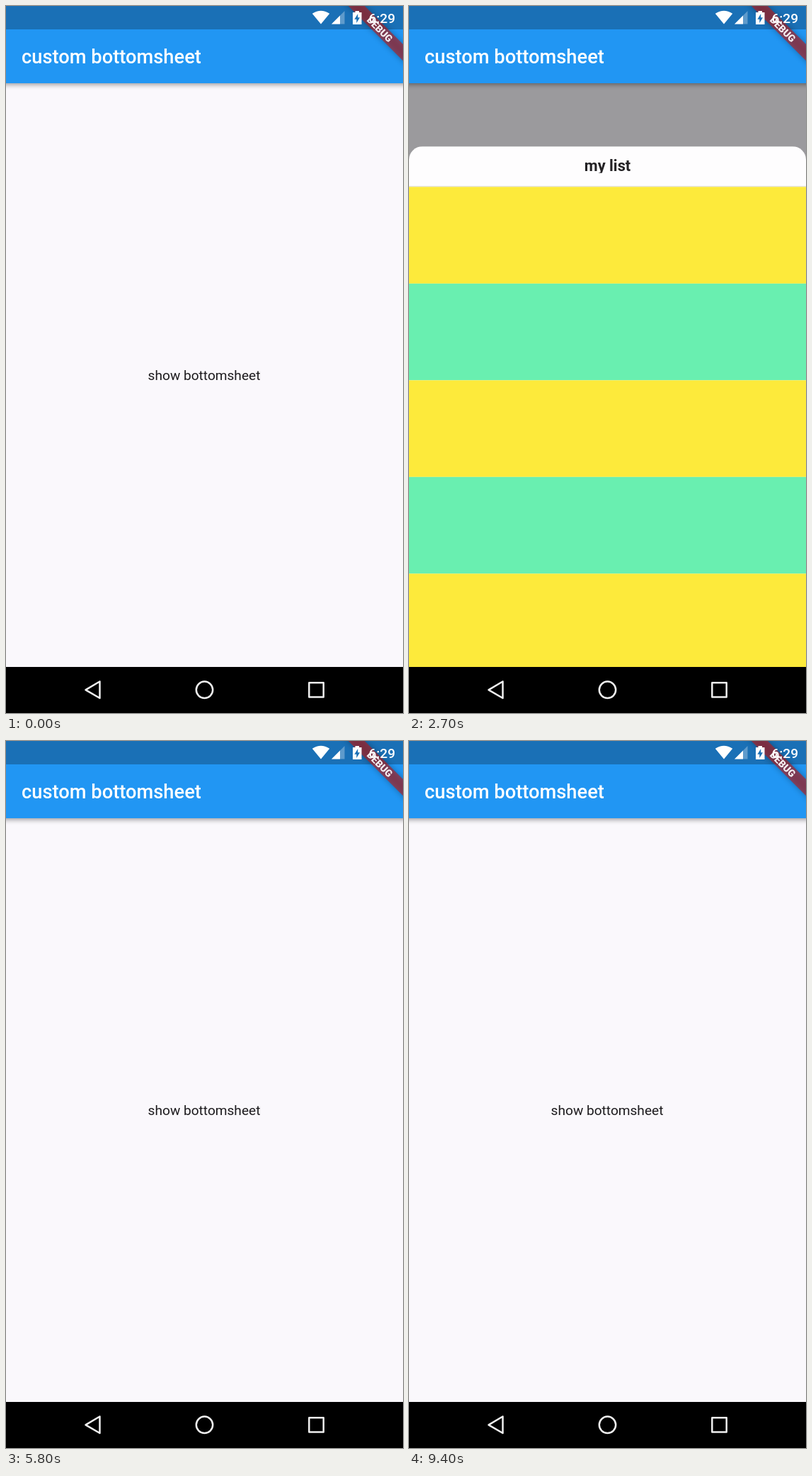
An HTML page with a canvas that plays this animation: 561x998 px, repeating every 9600 ms.

```html
<!DOCTYPE html>
<html lang="en">
<head>
<meta charset="utf-8">
<title>custom bottomsheet</title>
<style>
html, body { margin: 0; width: 100%; height: 100%; overflow: hidden; background: #000; }
canvas { display: block; width: 561px; height: 998px; }
</style>
</head>
<body>
<canvas id="stage" width="561" height="998"></canvas>
<script>
const ctx = document.getElementById('stage').getContext('2d');
const W = 561, H = 998, LOOP = 9600, STEP = 100;
const DP = W / 411, BAR = 33, BODY = 109, NAV = 933, HALF = 499, ROW = 100 * DP;

const linear = p => p;
const easeOut = p => 1 - (1 - p) ** 3;
const easeIn = p => p ** 1.5;

// Sheet top: [time, y, easing towards this point]
const sheetPath = [
  [0, NAV], [50, NAV], [450, HALF, easeOut],
  [2000, HALF], [2200, 421], [2900, BODY],
  [3100, BODY], [3400, 231], [4100, 482], [4200, 540], [4400, NAV],
  [4750, NAV], [5150, HALF, easeOut], [5400, HALF], [5700, NAV, easeIn],
  [6650, NAV], [7050, HALF, easeOut], [8500, HALF], [8750, NAV, easeIn],
  [LOOP, NAV]
];
// Back button highlight: [time, opacity]
const pressPath = [[0, 0], [8250, 0], [8450, 1], [8600, 1], [8900, 0], [LOOP, 0]];

function follow(path, t) {
  const i = path.findIndex(k => k[0] > t);
  const [t0, v0] = path[i - 1], [t1, v1, ease = linear] = path[i];
  return v0 + (v1 - v0) * ease((t - t0) / (t1 - t0));
}

function rect(x, y, w, h, color) {
  ctx.fillStyle = color;
  ctx.fillRect(x, y, w, h);
}

function poly(points, color) {
  ctx.beginPath();
  points.forEach(([x, y]) => ctx.lineTo(x, y));
  ctx.closePath();
  if (color) {
    ctx.fillStyle = color;
    ctx.fill();
  }
}

function text(str, x, y, size, weight, color, align = 'left') {
  ctx.font = `${weight} ${size}px Roboto, sans-serif`;
  ctx.textAlign = align;
  ctx.fillStyle = color;
  ctx.fillText(str, x, y);
}

function drawBody(top) {
  rect(0, BODY, W, NAV - BODY, '#faf8fc');
  text('show bottomsheet', W / 2 - 0.5, 527.5, 14 * DP, 400, '#1d1b1e', 'center');
  const shade = Math.min(1, (NAV - top) / (NAV - 540));
  if (shade > 0) rect(0, BODY, W, NAV - BODY, `rgba(0,0,0,${0.38 * shade})`);
}

function drawSheet(top) {
  if (top >= NAV) return;
  ctx.save();
  ctx.beginPath();
  ctx.roundRect(0, top, W, H, [19, 19, 0, 0]);
  ctx.clip();
  rect(0, top, W, H, '#fefdfe');

  ctx.save();
  ctx.beginPath();
  ctx.rect(0, top, W, 37.5);
  ctx.clip();
  text('my list', W / 2, top + 34.5, 16 * DP, 700, '#232124', 'center');
  ctx.restore();

  rect(0, top + 56, W, 1.2, '#dedcda');
  for (let i = 0, y = top + 57.2; y < NAV; i++, y += ROW) {
    rect(0, y, W, ROW, i % 2 ? '#69efb0' : '#fdea3b');
  }
  ctx.restore();
}

function drawAppBar() {
  ctx.save();
  ctx.shadowColor = 'rgba(0,0,0,0.4)';
  ctx.shadowBlur = 7;
  ctx.shadowOffsetY = 2;
  rect(-10, BAR, W + 20, BODY - BAR, '#2196f3');
  ctx.restore();
  rect(0, 0, W, BAR, '#1a70b6');
  text('custom bottomsheet', 22, 81, 20 * DP, 500, '#fff');
}

function drawBanner() {
  ctx.save();
  ctx.translate(W, 0);
  ctx.rotate(Math.PI / 4);
  ctx.scale(DP, DP);
  ctx.shadowColor = 'rgba(0,0,0,0.5)';
  ctx.shadowBlur = 8;
  rect(-50, 28, 100, 12, 'rgba(183,28,28,0.627)');
  ctx.shadowColor = 'transparent';
  text('DEBUG', 0, 37.6, 10.2, 900, '#f4eef1', 'center');
  ctx.restore();
}

function drawStatus() {
  ctx.fillStyle = '#fff';
  ctx.beginPath();
  ctx.moveTo(445, 25.5);
  ctx.lineTo(432.8, 10.8);
  ctx.quadraticCurveTo(445, 2.8, 457.2, 10.8);
  ctx.closePath();
  ctx.fill();

  poly([[460, 25.5], [478.5, 25.5], [478.5, 7]], 'rgba(255,255,255,0.3)');
  poly([[460, 25.5], [472, 25.5], [472, 13.5]], '#fff');

  rect(490, 9, 12.5, 17, '#fff');
  rect(493.5, 7, 5.5, 3, '#fff');
  poly([[497.2, 11], [492.4, 18.8], [495.3, 18.8], [495.3, 24], [500, 16.3], [497.2, 16.3]], '#1a70b6');

  text('6:29', 550, 24, 14 * DP, 500, '#fff', 'right');
}

function drawNav(press) {
  rect(0, NAV, W, H - NAV, '#000');
  if (press > 0) {
    ctx.fillStyle = `rgba(44,42,45,${press})`;
    ctx.beginPath();
    ctx.roundRect(51, NAV, 143.5, H - NAV, 32);
    ctx.fill();
  }
  ctx.strokeStyle = '#f0f0f0';
  ctx.lineWidth = 2.5;
  ctx.lineJoin = 'round';
  poly([[112.5, 965.3], [132.5, 953.5], [132.5, 977]]);
  ctx.stroke();
  ctx.beginPath();
  ctx.arc(280.5, 965.3, 11.7, 0, Math.PI * 2);
  ctx.stroke();
  ctx.strokeRect(428.3, 955.2, 20.4, 20.4);
}

function render(now) {
  const t = Math.floor(now % LOOP / STEP) * STEP;
  const top = follow(sheetPath, t);
  drawBody(top);
  drawSheet(top);
  drawAppBar();
  drawBanner();
  drawStatus();
  drawNav(follow(pressPath, t));
}

let start;
function tick(now) {
  start ??= now;
  render(Math.max(0, now - start));
  requestAnimationFrame(tick);
}
render(0);
requestAnimationFrame(tick);
</script>
</body>
</html>
```
